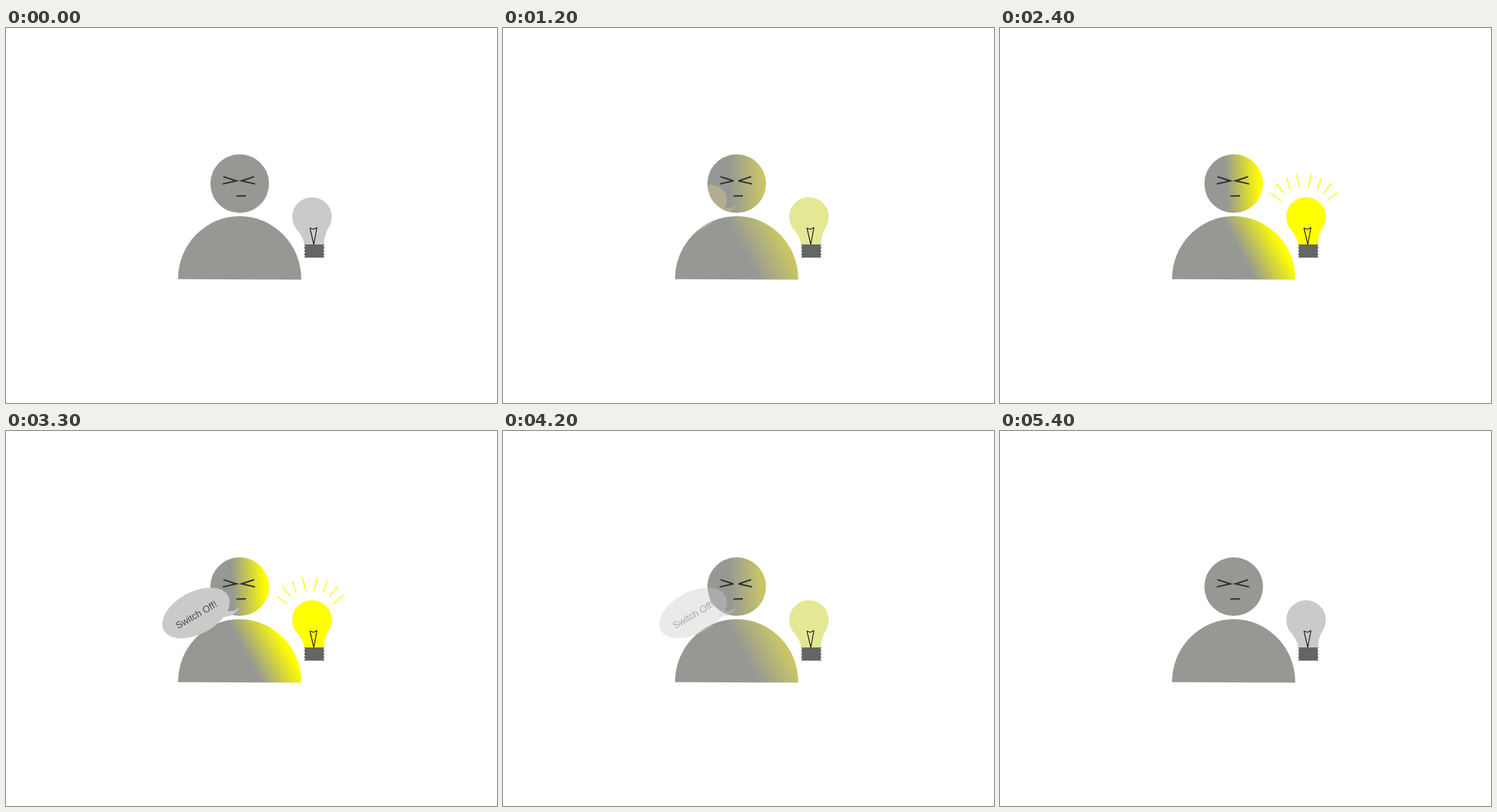
An HTML page with a canvas for the animation above (5700 ms loop, 745 px wide and 570 px high).

```html
<!DOCTYPE html>
<html lang="en">
<head>
<meta charset="utf-8">
<title>Switch on, switch off</title>
<style>
html, body { margin: 0; width: 100%; height: 100%; overflow: hidden; background: #fff; }
canvas { display: block; }
</style>
</head>
<body>
<canvas id="stage" width="745" height="570"></canvas>
<script>
const ctx = document.getElementById('stage').getContext('2d');
const LOOP = 5700, STEP = 300;
const GREY = '#969894', PALE = '#cacbc8', DARK = '#2f312e';

// Brightness stages: colours of the bulb and of the light cast on the figure
const LIGHT = [
  { bulb: PALE },
  { bulb: '#e4e793', cast: '#c9c666' },
  { bulb: '#ecee7c', cast: '#d2d15a', rays: 0.7 },
  { bulb: '#f3f568', cast: '#dcdd4c', rays: 1 },
  { bulb: '#fafa34', cast: '#eeee26', rays: 1 },
  { bulb: '#ffff00', cast: '#ffff00', rays: 1 }
];

const RAYS = [
  [411, 251, 427, 263.5], [419, 236.5, 431.5, 251],
  [435, 228, 440.5, 246], [449.5, 222, 455, 243],
  [472.5, 222, 467.5, 242.5], [487.5, 227, 481.5, 245],
  [503.5, 236, 490.5, 251.5], [512, 250, 496, 262.5]
];

function line(points, color, width, join = 'miter') {
  ctx.beginPath();
  for (let i = 0; i < points.length; i += 2) ctx.lineTo(points[i], points[i + 1]);
  ctx.strokeStyle = color;
  ctx.lineWidth = width;
  ctx.lineJoin = join;
  ctx.stroke();
}

function shade(x0, y0, x1, y1, cast) {
  if (!cast) return GREY;
  const g = ctx.createLinearGradient(x0, y0, x1, y1);
  g.addColorStop(0, GREY);
  g.addColorStop(1, cast);
  return g;
}

function headPath() {
  const p = new Path2D();
  p.arc(354.6, 236.6, 44.5, 0, Math.PI * 2);
  return p;
}

function bodyPath() {
  const p = new Path2D();
  p.moveTo(261, 381.7);
  p.ellipse(354.5, 381.7, 93.5, 95.7, 0, Math.PI, Math.PI * 2);
  p.lineTo(448, 382.5);
  p.closePath();
  return p;
}

function bubblePath() {
  const p = new Path2D();
  p.ellipse(288.3, 276.7, 55.4, 32.1, -28 * Math.PI / 180, 0, Math.PI * 2);
  const tail = new Path2D('M334 273Q346 276 354.5 267.5Q348 283 326 283Z');
  return [p, tail];
}

const HEAD = headPath(), BODY = bodyPath(), BUBBLE = bubblePath();

function drawFigure(cast, soft) {
  ctx.fillStyle = shade(343, 236, 394, 233, cast);
  ctx.fill(HEAD);
  ctx.fillStyle = shade(387, 382, 440, 353.8, cast);
  ctx.fill(BODY);
  const join = soft ? 'bevel' : 'miter';
  line([330, 226, 349.5, 232.3, 329, 237], DARK, 2.3, join);
  line([376.5, 226, 357.5, 232.3, 378, 237], DARK, 2.3, join);
  line([349.5, 255.5, 364, 255.2], DARK, 2.2);
}

function drawBulb(color) {
  ctx.fillStyle = color;
  ctx.beginPath();
  ctx.arc(464.3, 287.2, 30, 0, Math.PI * 2);
  ctx.fill();
  ctx.fill(new Path2D('M439 303Q451 317 453 330H482.5Q482 317 489.5 303Z'));

  // Screw base with rippled sides
  ctx.fillStyle = '#646663';
  ctx.beginPath();
  for (let y = 329; y <= 349; y++) ctx.lineTo(453.1 - 0.8 * Math.cos((y - 329) * 1.26), y);
  for (let y = 349; y >= 329; y--) ctx.lineTo(482.4 + 0.8 * Math.cos((y - 329) * 1.26), y);
  ctx.fill();
  line([467, 329, 461.2, 304, 466.5, 306, 471.8, 303.2, 467, 329], '#111', 1.2, 'bevel');
}

function drawRays(alpha) {
  ctx.globalAlpha = alpha;
  for (const ray of RAYS) line(ray, '#ffff00', 1.5);
  ctx.globalAlpha = 1;
}

function fillBubble(color) {
  ctx.fillStyle = color;
  for (const part of BUBBLE) ctx.fill(part);
}

function drawBubble(text, alpha) {
  ctx.save();
  ctx.globalAlpha = alpha;
  fillBubble(PALE);
  ctx.translate(261, 301);
  ctx.rotate(-30 * Math.PI / 180);
  ctx.font = '14.5px "Liberation Sans", Arial, sans-serif';
  ctx.fillStyle = '#4c4e4b';
  ctx.fillText(text, 0, 0);
  ctx.restore();
}

// Faint trace of the bubble, left only on the figure
function drawTrace() {
  ctx.save();
  const area = new Path2D(HEAD);
  area.addPath(BODY);
  ctx.clip(area);
  fillBubble('#b4ac91');
  ctx.restore();
}

function lightAt(step) {
  if (step < 4 || step > 14) return 0;
  if (step === 14) return 1;
  return Math.min(step - 3, 5);
}

function draw(time) {
  const step = Math.floor((time % LOOP) / STEP);
  const level = lightAt(step);
  const light = LIGHT[level];
  ctx.fillStyle = '#fff';
  ctx.fillRect(0, 0, 745, 570);
  drawFigure(light.cast, level > 0 && level < 5);
  drawBulb(light.bulb);
  if (light.rays) drawRays(light.rays);
  if (step >= 1 && step < 4) drawBubble('Switch On!', 1);
  if (step === 4) drawTrace();
  if (step >= 11 && step < 14) drawBubble('Switch Off!', 1);
  if (step === 14) drawBubble('Switch Off!', 0.4);
}

const start = performance.now();
function tick() {
  draw(performance.now() - start);
  requestAnimationFrame(tick);
}
tick();
</script>
</body>
</html>
```
